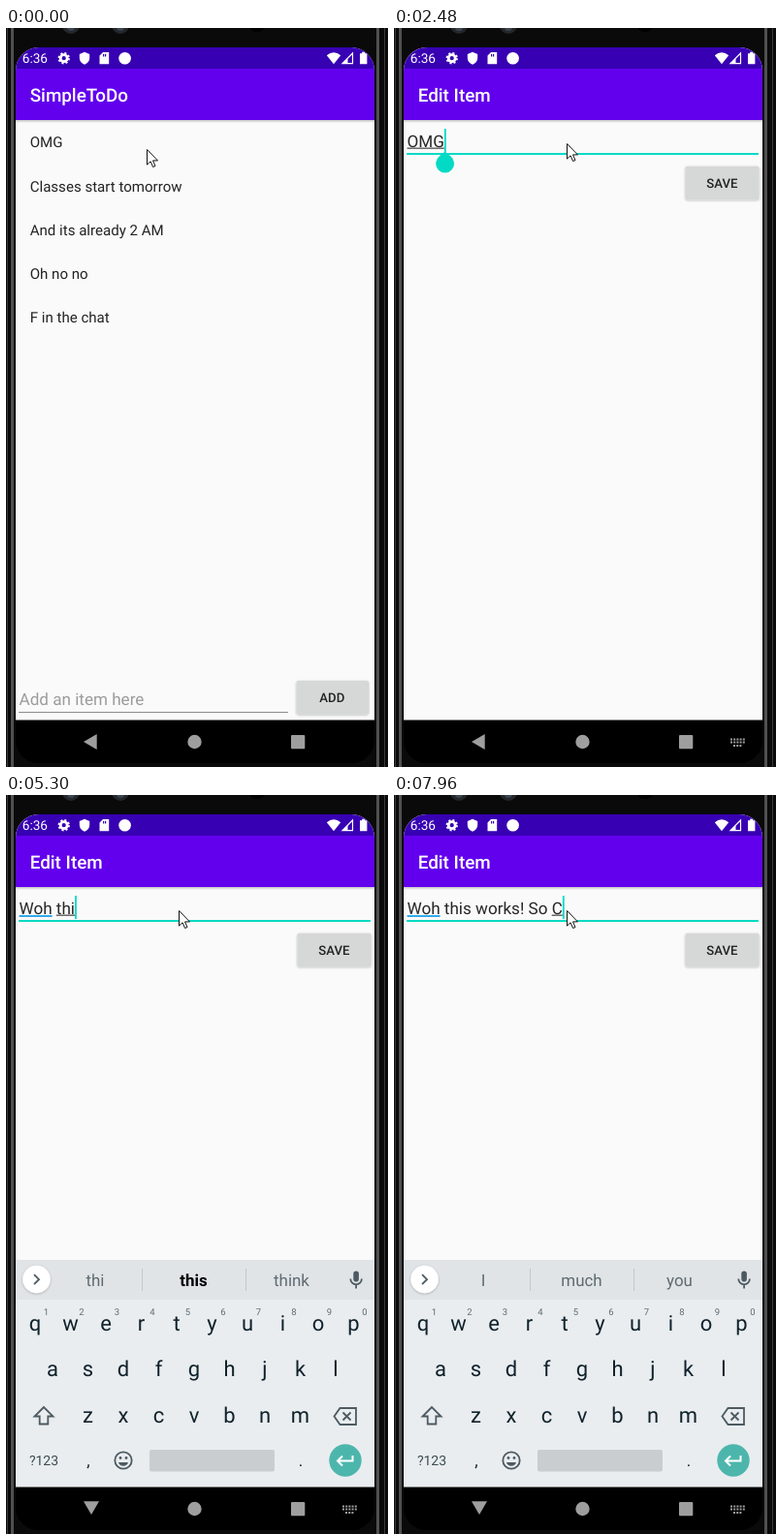
These frames come from a looping animation (394 px wide and 763 px high, 8000 ms). An HTML page:

```html
<!DOCTYPE html>
<html lang="en">
<head>
<meta charset="utf-8">
<title>To-do list</title>
<style>
html, body { margin: 0; width: 100%; height: 100%; overflow: hidden; background: #0a0a0a; }
svg { display: block; width: 394px; height: 763px; }
text { font-family: Roboto, sans-serif; white-space: pre; text-rendering: geometricPrecision; }
.bar { font-size: 18.84px; font-weight: 500; fill: #fff; }
.row { font-size: 15.07px; fill: #232323; }
.edit { font-size: 17.1px; fill: #272727; }
.hint { fill: #9c9c9c; }
.btn { font-size: 13.19px; font-weight: 500; fill: #222; text-anchor: middle; }
.key { font-size: 22px; fill: #10222b; text-anchor: middle; }
.num { font-size: 9.5px; fill: #5f6b72; text-anchor: middle; }
.sug { font-size: 16.96px; fill: #5f6a70; text-anchor: middle; }
.sug.bold { font-weight: 700; fill: #000; }
.line { fill: none; stroke: #4d5a61; stroke-width: 1.8; }
.page { transform-origin: 195px 388px; }
</style>
</head>
<body>
<svg viewBox="0 0 394 763">
  <defs>
    <clipPath id="screen"><rect x="10" y="20" width="370" height="739" rx="24"/></clipPath>
    <clipPath id="imeArea"><rect x="10" y="95" width="370" height="619"/></clipPath>
    <linearGradient id="shade" x2="0" y2="1">
      <stop stop-color="#000" stop-opacity=".22"/><stop offset="1" stop-color="#000" stop-opacity="0"/>
    </linearGradient>
    <filter id="drop" x="-20%" y="-30%" width="140%" height="170%">
      <feDropShadow dx="0" dy=".7" stdDeviation=".8" flood-opacity=".3"/>
    </filter>
    <g id="gear" fill="none">
      <circle r="3.5" stroke-width="2.8"/>
      <circle r="5.3" stroke-width="1.8" stroke-dasharray="2.08"/>
    </g>
    <g id="frame">
      <rect x="10" y="20" width="370" height="739" fill="#000"/>
      <rect x="10" y="20" width="370" height="694.5" fill="#fafafa"/>
      <rect x="10" y="20" width="370" height="22.5" fill="#3700b3"/>
      <rect x="10" y="42" width="370" height="53" fill="#6200ee"/>
      <rect x="10" y="95" width="370" height="3" fill="url(#shade)"/>
    </g>
  </defs>

  <rect width="394" height="763" fill="#0a0a0a"/>
  <path d="M6.500 0v763M383.500 0v763" stroke="#505050" stroke-width="3"/>
  <path d="M1.500 0v763M390.500 0v763" stroke="#3a3a3a"/>
  <g fill="#24272b"><circle cx="67" cy="-3" r="9"/><circle cx="118" cy="-3" r="9"/></g>
  <g fill="#3d4650"><circle cx="67" cy="-1" r="4"/><circle cx="118" cy="-1" r="4"/></g>
  <ellipse cx="259" cy="0" rx="7" ry="4" fill="#000"/>

  <g clip-path="url(#screen)">
    <rect x="10" y="20" width="370" height="739"/>
    <g id="list" class="page">
      <use href="#frame"/>
      <text class="bar" x="24.7" y="76">SimpleToDo</text>
      <g id="rows"></g>
      <text class="edit hint" x="13.5" y="699">Add an item here</text>
      <rect x="13" y="706" width="278" height="1" fill="#8c8c8c"/>
      <rect x="299.5" y="674" width="74.5" height="34.5" rx="2" fill="#d6d7d7" filter="url(#drop)"/>
      <text class="btn" x="336.3" y="696">ADD</text>
    </g>
    <g id="editor" class="page">
      <use href="#frame"/>
      <text class="bar" x="24.7" y="76">Edit Item</text>
      <rect id="rule" x="13" width="363"/>
      <text id="empty" class="edit hint" x="13.5" y="122.9">Item description</text>
      <text id="field" class="edit" x="13.5" y="122.9"></text>
      <rect id="spell" x="13.5" y="124" height="2" fill="#33a9ea"/>
      <rect id="under" y="123.6" height="1.1" fill="#333"/>
      <rect id="caret" y="104" width="1.8" height="24" fill="#03dac5"/>
      <path id="handle" d="M52.6 127.6l6 5A9.5 9.5 0 1 1 46.600 132.600z" fill="#03dac5"/>
      <rect x="300.5" y="142.700" width="76" height="34.5" rx="2" fill="#d6d7d7" filter="url(#drop)"/>
      <text class="btn" x="338.3" y="165">SAVE</text>
    </g>

    <g clip-path="url(#imeArea)"><g id="ime">
      <rect x="10" y="480" width="370" height="235" fill="#e9edf0"/>
      <rect x="10" y="480" width="370" height="41" fill="#e0e4e7"/>
      <circle cx="31.5" cy="500" r="14.3" fill="#fff" filter="url(#drop)"/>
      <path id="chevron" class="line" d="M29 495.2l5 5-5 5"/>
      <g id="words">
        <path d="M140.5 489v23M247.5 489v23" stroke="#c3c8cc"/>
        <text class="sug" x="92" y="507"></text>
        <text class="sug" x="193.5" y="507"></text>
        <text class="sug" x="294.5" y="507"></text>
      </g>
      <g id="tools" class="line">
        <path d="M73 494h14v8l-5 5h-9zM87 502h-5v5"/>
        <rect x="128" y="493.5" width="18" height="14" rx="2"/>
        <text x="137" y="504" font-size="8.5" font-weight="700" text-anchor="middle" fill="#4d5a61" stroke="none">GIF</text>
        <path d="M188 494h14v14h-14zM192 494v-2h6v2M191 499h8M191 503h6"/>
        <use href="#gear" transform="translate(252 500.5) scale(1.25)" stroke="#4d5a61"/>
        <g fill="#4d5a61" stroke="none"><circle cx="303" cy="500" r="2"/><circle cx="309" cy="500" r="2"/><circle cx="315" cy="500" r="2"/></g>
      </g>
      <rect x="358.3" y="491.5" width="5.6" height="11" rx="2.8" fill="#4d5a61"/>
      <path class="line" d="M355.3 499.5a5.800 5.800 0 0 0 11.600 0M361.100 505.500v4"/>
      <g id="keys"></g>
      <path id="shift" class="line" d="M39 632l-9.500 9.500h5.200v8h8.600v-8h5.200z"/>
      <path class="line" d="M344.500 633h16.500v17h-16.500l-6-8.500zM347.500 637.500l8 8M355.500 637.500l-8 8"/>
      <text x="39" y="692" font-size="14" text-anchor="middle" fill="#3c4a51">?123</text>
      <text x="85" y="693" font-size="17" text-anchor="middle" fill="#10222b">,</text>
      <text x="304" y="693" font-size="17" text-anchor="middle" fill="#10222b">.</text>
      <circle class="line" cx="121" cy="687" r="8.7"/>
      <circle cx="118" cy="684.5" r="1.4" fill="#4d5a61"/>
      <circle cx="124" cy="684.5" r="1.4" fill="#4d5a61"/>
      <path d="M116 689h10a5.200 5.200 0 0 1-10 0z" fill="#4d5a61"/>
      <rect x="148" y="676" width="129" height="22.5" rx="2" fill="#c9cdd0"/>
      <circle cx="350" cy="687" r="16.7" fill="#4db6ac"/>
      <path d="M357.5 682v5.500h-15M347 682.500l-5 5 5 5" fill="none" stroke="#fff" stroke-width="2"/>
    </g></g>

    <text x="16.8" y="36" font-size="13.6" fill="#fff">6:36</text>
    <use href="#gear" x="59.7" y="31.2" stroke="#fff"/>
    <g fill="#fff">
      <path d="M81 24.800l5.200 2.200v4q0 4.600-5.200 6.800-5.200-2.200-5.200-6.800v-4z"/>
      <path fill-rule="evenodd" d="M100 25h6.200v12.300h-9.700v-8.800zM100 27v2.500h1.200v-2.500zM102 27v2.500h1.200v-2.500z"/>
      <circle cx="122.6" cy="31.2" r="6.3"/>
      <path d="M338 37.200l-7.200-9q7.200-6 14.400 0z"/>
      <path d="M357.500 26v10.700h-10.500z" fill="none" stroke="#fff" stroke-width="1.200"/>
      <path d="M352.500 31.300v5.400h-5.500z"/>
      <path d="M365 26.300h2.200v-1.500h3v1.500h2.200v11h-7.400z"/>
    </g>
    <g fill="#9e9e9e">
      <path id="back" d="M80 737l13.700-8v16z"/>
      <circle cx="194.5" cy="737" r="7.2"/>
      <rect x="294" y="730" width="14.3" height="14.3" rx="1"/>
      <path id="switcher" d="M347 734.500h15M347 737.500h15M350 741h9" fill="none" stroke="#9e9e9e" stroke-width="2" stroke-dasharray="2 1.200"/>
    </g>
  </g>
  <path id="mouse" d="M.5.5v15.600l3.600-3.300 2.500 5.700 2.400-1-2.500-5.600h5z" fill="#fff" stroke="#111"/>
</svg>

<script>
const LOOP = 8000;
const $ = id => document.getElementById(id);
const show = (id, on) => $(id).style.display = on ? '' : 'none';
const set = (id, attrs) => Object.entries(attrs).forEach(([k, v]) => $(id).setAttribute(k, v));

const ink = document.createElement('canvas').getContext('2d');
ink.font = '17.1px Roboto, sans-serif';
const width = s => ink.measureText(s).width;

function addText(parent, cls, x, y, str) {
  const el = document.createElementNS('http://www.w3.org/2000/svg', 'text');
  el.setAttribute('class', cls);
  el.setAttribute('x', x);
  el.setAttribute('y', y);
  el.textContent = str;
  return $(parent).appendChild(el);
}

['OMG', 'Classes start tomorrow', 'And its already 2 AM', 'Oh no no', 'F in the chat']
  .forEach((s, i) => addText('rows', 'row', 24.7, 123.3 + 45.25 * i, s));

const letters = [];
[['qwertyuiop', 30, 553], ['asdfghjkl', 48, 600], ['zxcvbnm', 84.5, 648]].forEach(([row, x, y], r) =>
  [...row].forEach((c, i) => {
    letters.push(addText('keys', 'key', x + 36.5 * i, y, c));
    if (!r) addText('keys', 'num', x + 11.3 + 36.5 * i, 537, (i + 1) % 10);
  }));

// Each step changes only the named parts of the state.
// open: [list scale, editor scale, editor opacity]; ime: [offset, opacity]
const steps = [
  [0, { open: [1, 1, 0], mouse: [145, 125], done: 'OMG', comp: '', focus: 0, caret: 0, handle: 0,
        ime: [0, 0], back: 0, switcher: 0, words: ['', '', ''], bold: 0, tools: 0, caps: 0 }],
  [980, { open: [1.02, .89, .35], mouse: [145, 126] }],
  [1110, { open: [1.045, .975, 1], mouse: [146, 128] }],
  [1240, { open: [1.05, .9985, 1] }],
  [1380, { open: [1, 1, 1] }],
  [1500, { mouse: [157, 127] }],
  [1650, { mouse: [171, 122] }],
  [1780, { mouse: [178, 119] }],
  [2090, { focus: 1 }],
  [2210, { caret: 1 }],
  [2330, { handle: 1 }],
  [2480, { done: '', comp: 'OMG', switcher: 1 }],
  [2600, { ime: [20, .75], back: -45 }],
  [2750, { ime: [0, 1], back: -90, words: ['OMG', 'OMG SO', 'ONG'] }],
  [2900, { caret: 0 }],
  [3330, { caret: 1 }],
  [3600, { comp: 'OM', handle: 0, words: ['OM', 'OMG', 'On'] }],
  [3720, { comp: 'O', words: ['O', 'Of', 'On'] }],
  [3840, { comp: '', tools: 1 }],
  [4270, { done: 'W' }],
  [4390, { done: '', comp: 'W' }],
  [4540, { comp: 'Wo', tools: 0, words: ['Wo', 'Would', 'Work'], bold: 1 }],
  [4790, { comp: 'Woh', words: ['Woh', 'Who', 'Won'] }],
  [4940, { done: 'Woh ', comp: '', words: ['I', 'the', 'is'], bold: 0 }],
  [5060, { comp: 't', words: ['t', 'the', 'to'] }],
  [5180, { comp: 'th', words: ['th', 'the', 'that'], bold: 1 }],
  [5300, { comp: 'thi', words: ['thi', 'this', 'think'] }],
  [5450, { comp: 'this', words: ['this', 'thistle', 'things'], bold: 0 }],
  [5570, { done: 'Woh this ', comp: '', words: ['is', 'week', 'morning'] }],
  [5720, { comp: 'wo', words: ['wo', 'would', 'work'], bold: 1 }],
  [5870, { comp: 'work', words: ['work', 'works', 'working'], bold: 0 }],
  [5990, { comp: 'works', words: ['works', 'workshop', 'work'] }],
  [6580, { caret: 0 }],
  [7010, { caret: 1 }],
  [7160, { done: 'Woh this works!', comp: '', tools: 1 }],
  [7440, { done: 'Woh this works! ', caps: 1 }],
  [7560, { comp: 'So', caps: 0, tools: 0, words: ['So', 'Some', 'Sorry'] }],
  [7710, { done: 'Woh this works! So ', comp: '', words: ['I', 'much', 'you'] }],
  [7840, { caps: 1 }],
  [7960, { comp: 'C', caps: 0 }]
];

function draw(s) {
  const [listScale, editScale, alpha] = s.open;
  $('list').style.transform = listScale === 1 ? '' : `scale(${listScale})`;
  $('editor').style.transform = editScale === 1 ? '' : `scale(${editScale})`;
  $('editor').style.opacity = alpha;
  set('mouse', { transform: `translate(${s.mouse})` });

  const text = s.done + s.comp, start = width(s.done), end = width(text);
  $('field').textContent = text;
  show('empty', !text);
  show('spell', s.done.startsWith('Woh '));
  set('spell', { width: width('Woh') });
  set('under', { x: 13.5 + start, width: end - start });
  set('caret', { x: 13.6 + end });
  show('caret', s.caret);
  show('handle', s.handle);
  set('rule', s.focus ? { y: 129, height: 2, fill: '#03dac5' } : { y: 129.3, height: 1, fill: '#8c8c8c' });

  const [shift, opacity] = s.ime;
  set('ime', { transform: `translate(0 ${shift})`, opacity });
  set('back', { transform: s.back ? `translate(1 -1) rotate(${s.back} 87 737)` : '' });
  show('switcher', s.switcher);
  show('words', !s.tools);
  show('tools', s.tools);
  set('chevron', { transform: s.tools ? 'rotate(180 31.5 500.2)' : '' });
  document.querySelectorAll('.sug').forEach((el, i) => {
    el.textContent = s.words[i];
    el.classList.toggle('bold', i === 1 && !!s.bold);
  });
  letters.forEach(el => {
    const c = el.textContent;
    el.textContent = s.caps ? c.toUpperCase() : c.toLowerCase();
  });
  $('shift').style.fill = s.caps ? '#4d5a61' : 'none';
}

let last = -1;
function tick() {
  const t = performance.now() % LOOP;
  const n = steps.filter(([at]) => at <= t).length;
  if (n !== last) {
    last = n;
    draw(Object.assign({}, ...steps.slice(0, n).map(([, change]) => change)));
  }
  requestAnimationFrame(tick);
}
tick();
</script>
</body>
</html>
```
